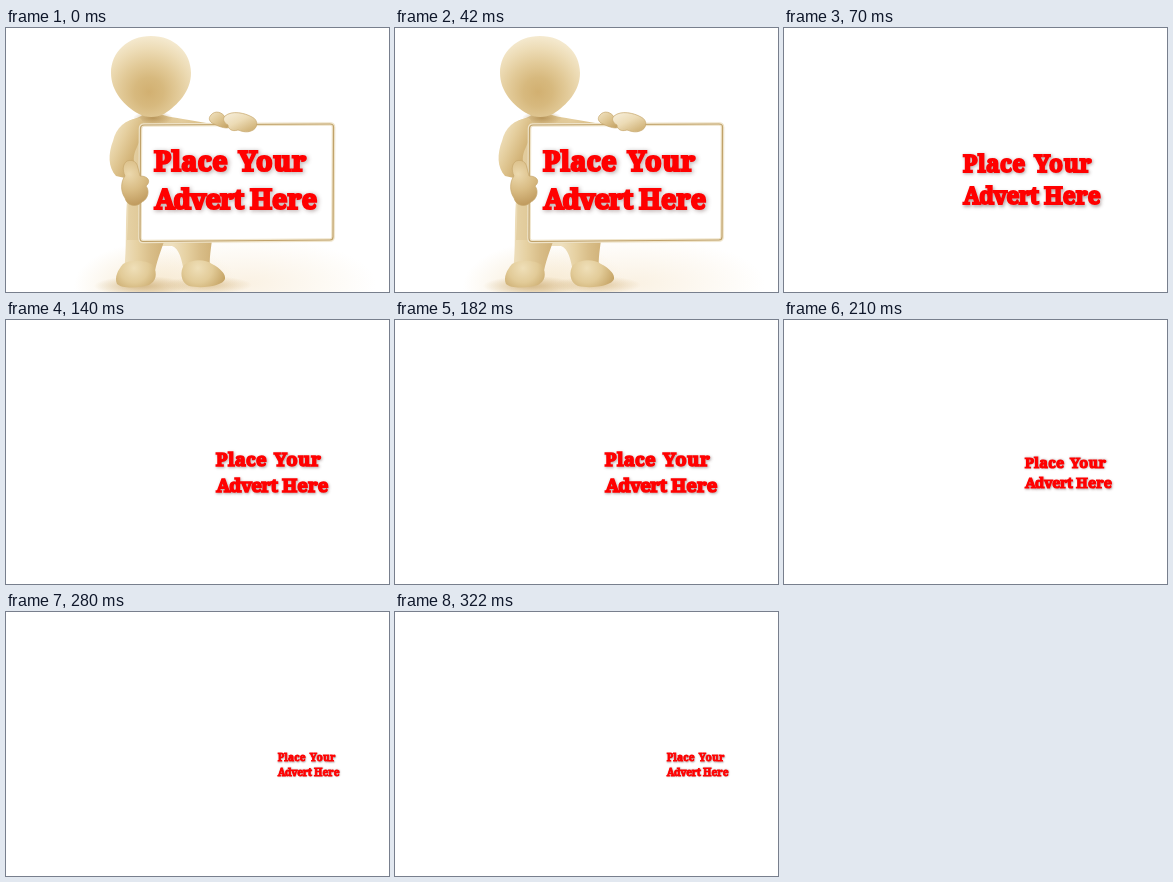
An HTML page with a canvas that plays this animation: 383x264 px, repeating every 0.35 s.

```html
<!DOCTYPE html>
<html lang="en">
<head>
<meta charset="utf-8">
<title>Place Your Advert Here</title>
<style>
  html, body { margin: 0; width: 100%; height: 100%; overflow: hidden; background: #fff; }
  canvas { display: block; }
</style>
</head>
<body>
<canvas id="stage" width="383" height="264"></canvas>
<script>
const ctx = document.getElementById('stage').getContext('2d');
const STEP_MS = 70, STEPS = 5;
const VANISH = { x: 347.4, y: 153.6 };
const SHRINK = 0.155;

function fillStops(gradient, colors) {
  colors.forEach((color, i) => gradient.addColorStop(i / (colors.length - 1), color));
  return gradient;
}

function radial(x, y, r, ...colors) {
  return fillStops(ctx.createRadialGradient(x, y, 0, x, y, r), colors);
}

function linear(x0, y0, x1, y1, ...colors) {
  return fillStops(ctx.createLinearGradient(x0, y0, x1, y1), colors);
}

function shape(path, fill, edge) {
  const p = new Path2D(path);
  ctx.fillStyle = fill;
  ctx.fill(p);
  if (edge) {
    ctx.strokeStyle = edge;
    ctx.lineWidth = 0.7;
    ctx.stroke(p);
  }
}

function softSpot(x, y, rx, ry, color) {
  ctx.save();
  ctx.translate(x, y);
  ctx.scale(rx, ry);
  ctx.fillStyle = radial(0, 0, 1, `rgba(${color},0.8)`, `rgba(${color},0.4)`, `rgba(${color},0)`);
  ctx.fillRect(-1, -1, 2, 2);
  ctx.restore();
}

function drawFloor() {
  softSpot(240, 255, 130, 46, '249,238,220');
  softSpot(150, 258, 82, 44, '245,228,197');
  softSpot(136, 258, 48, 10, '205,174,120');
  softSpot(202, 257, 44, 9, '218,190,142');
}

function drawBody() {
  const legTone = x => linear(x, 0, x + 40, 0, '#eedfbd', '#e6d1a2', '#d9be89', '#d0b178');
  const foot = (x, y) => radial(x, y, 29, '#efdfb8', '#e2cb98', '#c5a364');

  shape('M150 205 L207 205 C205 220 203 231 204 242 L178 244 C176 232 173 220 166 218 L155 218Z', legTone(167));
  shape('M178 237 C186 231 199 231 206 236 C214 240 220 246 219 251 C217 258 196 261 183 258 C174 254 174 243 178 237Z',
        foot(192, 240));
  shape('M121 172 L166 172 C167 200 155 216 149 243 L118 243 C121 220 119 198 121 172Z', legTone(118));
  shape('M117 236 C125 231 140 232 147 237 C152 246 150 253 143 257 C133 260 116 261 111 256 C108 249 112 242 117 236Z',
        foot(128, 240));

  shape('M128 91 C134 89 137 87 139 84 L152 84 C155 88 166 89 183 92 L206 96 L206 212 L121 212 C124 180 122 135 118 100 C120 94 124 92 128 91Z',
        linear(117, 0, 205, 0, '#e6d3a8', '#dcc28d', '#e3cc9c', '#d9bc82'));
  softSpot(147, 90, 20, 7, '176,139,78');
  shape('M134 90 C119 91 110 100 107 113 C102 126 102 139 110 148 L128 152 L132 139 C126 136 127 127 131 119 C136 108 141 97 134 90Z',
        linear(104, 110, 136, 125, '#efe0bd', '#e5cf9f', '#d8bb82', '#c9a768'));
}

function drawHead() {
  shape('M145 8 C168 8 185 24 185 45 C185 63 172 77 158 86 C150 90 140 90 133 86 C118 78 105 63 105 45 C105 24 122 8 145 8Z',
        radial(143, 64, 58, '#d2b071', '#d7b97e', '#e2ca98', '#eddcb6', '#f6ecd4'));
}

function drawBoard() {
  const outline = new Path2D('M138 97 L324 96 Q327.5 96 327.5 99 L327 209 Q327 212 324 212 L137 213.5 Q134 213.5 134 210 L134.5 101 Q134.5 97 138 97Z');
  ctx.save();
  ctx.shadowColor = 'rgba(150,115,60,0.3)';
  ctx.shadowBlur = 3;
  ctx.fillStyle = '#fff';
  ctx.fill(outline);
  ctx.restore();
  ctx.strokeStyle = '#efe4ca';
  ctx.lineWidth = 3.6;
  ctx.stroke(outline);
  ctx.strokeStyle = '#c0a26a';
  ctx.lineWidth = 1.2;
  ctx.stroke(outline);
}

function drawHands() {
  const edge = '#c8a86d';
  shape('M121 133 C127 131 131 134 132 140 L134 148 C143 148 145 154 140 158 C144 163 142 171 136 174 C130 180 121 178 119 170 C114 163 115 153 119 148 C116 141 117 136 121 133Z',
        radial(123, 146, 33, '#ecd9ae', '#d9bc84', '#bd975a'), edge);
  shape('M205 87 C209 82 216 84 219 89 L225 98 C222 102 214 99 208 96 C203 94 202 90 205 87Z',
        linear(205, 83, 219, 101, '#f1e4c5', '#dfc794', '#c5a365'), edge);
  shape('M219 88 C226 82 239 85 246 89 C253 92 252 101 245 103 C240 105 235 103 232 102 C226 104 222 101 222 97 C218 95 216 91 219 88Z',
        linear(226, 83, 237, 105, '#f6edd8', '#ecdbb5', '#d3b67d'), edge);
}

function drawFigure() {
  drawFloor();
  drawBody();
  drawHead();
  drawBoard();
  drawHands();
}

function word(text, x, y, spacing, scale) {
  ctx.letterSpacing = `${spacing}px`;
  ctx.shadowColor = 'rgba(70,40,40,0.45)';
  ctx.shadowBlur = 4 * scale;
  ctx.strokeText(text, x, y);
  ctx.shadowColor = 'transparent';
  ctx.fillText(text, x, y);
}

function drawSlogan(scale) {
  ctx.save();
  ctx.translate(VANISH.x, VANISH.y);
  ctx.scale(scale, scale);
  ctx.translate(-VANISH.x, -VANISH.y);
  ctx.font = 'bold 27px "Noto Serif", serif';
  ctx.lineJoin = 'miter';
  ctx.miterLimit = 3;
  ctx.lineWidth = 2.2;
  ctx.fillStyle = ctx.strokeStyle = '#f00';
  ctx.shadowOffsetX = 1.3 * scale;
  ctx.shadowOffsetY = 1.5 * scale;
  word('Place', 148, 142.5, 0.3, scale);
  word('Your', 232.5, 142.5, 0.7, scale);
  word('Advert', 148.5, 180.5, -0.9, scale);
  word('Here', 244, 180.5, 0, scale);
  ctx.restore();
}

function render() {
  const step = Math.floor(performance.now() / STEP_MS) % STEPS;
  ctx.fillStyle = '#fff';
  ctx.fillRect(0, 0, 383, 264);
  if (step === 0) drawFigure();
  drawSlogan(1 - SHRINK * step);
  requestAnimationFrame(render);
}

render();
</script>
</body>
</html>
```
